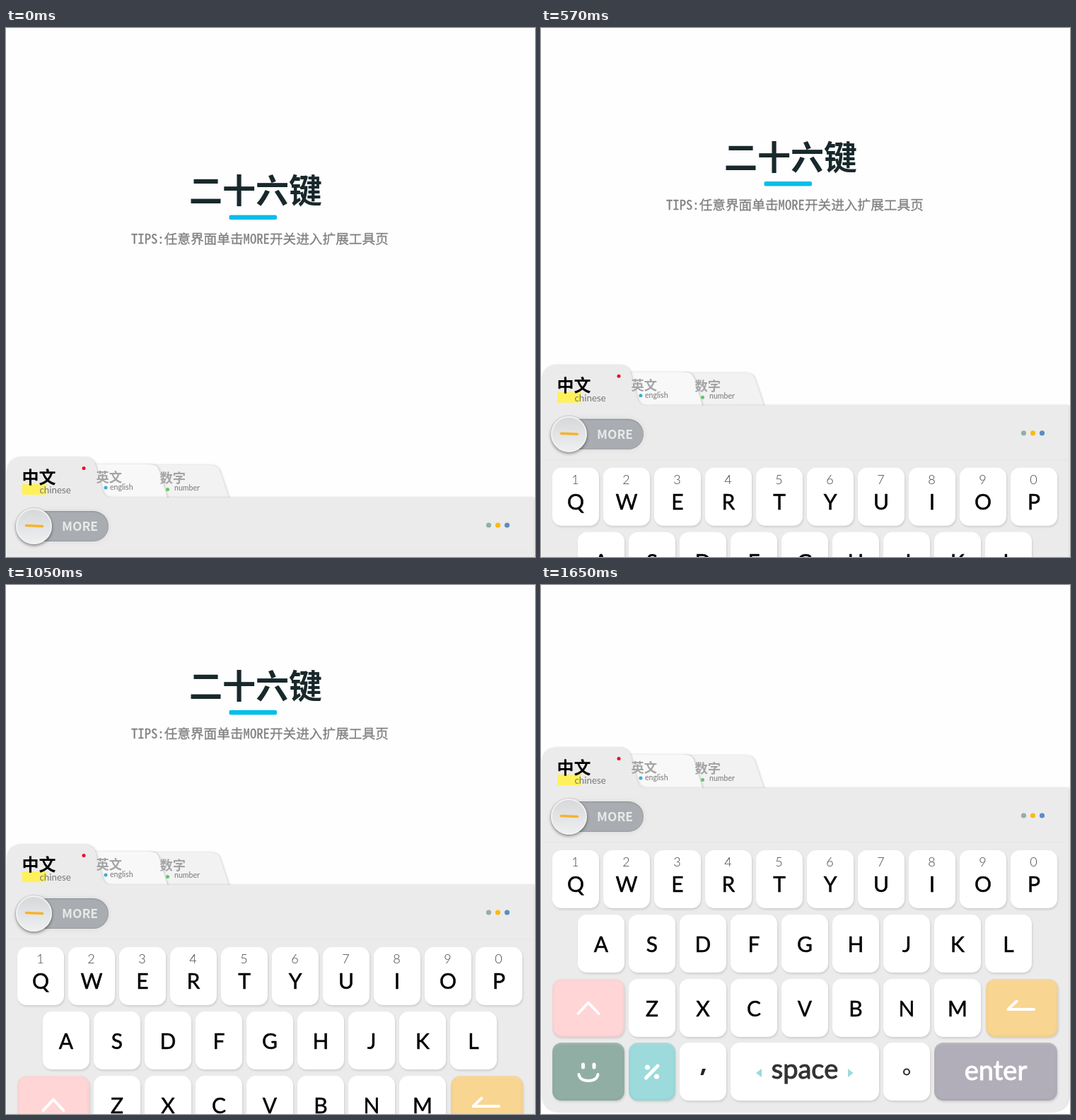
An HTML page that plays this animation: 748 px wide and 748 px high, repeating every 2.65 s.

```html
<!DOCTYPE html>
<html lang="zh-CN">
<meta charset="utf-8">
<style>
html, body { margin: 0; width: 100%; height: 100%; overflow: hidden; background: #fefefe }
#stage { position: absolute; left: 0; top: 0; width: 748px; height: 748px; overflow: hidden }
#title, #board, #board svg { position: absolute; left: 0; top: 0; width: 748px; height: 748px }
.key, .pill, .knob { position: absolute; box-sizing: border-box }
.key { height: 82px; border-radius: 13px; background: #fff; box-shadow: 1px 2px 3px #0000001f }
.key.tint { box-shadow: 1px 2px 3px #0000001f, inset 0 2px 3px #ffffff40, inset 0 0 4px #00000018 }
.pill { left: 22px; top: 306px; width: 123px; height: 43px; border-radius: 22px; background: #a9adb1;
  box-shadow: inset 0 1px 2px #0000002e, inset 0 -1px 1px #00000018, 0 0 9px #00000012 }
.knob { left: 14px; top: 302px; width: 51px; height: 51px; border-radius: 50%; border: 2px solid #f1f1f1;
  background: linear-gradient(#d6d8da, #eeeff0); box-shadow: 0 2px 4px #0000006b, 0 0 2px #00000040 }
svg { overflow: visible }
text { font-family: Lato, sans-serif }
.cjk { font-family: "Noto Sans CJK SC", "Noto Sans CJK", sans-serif; font-weight: 700 }
.tips { font: 18.67px "Noto Sans Mono CJK SC", "Noto Sans CJK SC", monospace; fill: #808080; stroke: #808080; stroke-width: .3 }
.tab { filter: drop-shadow(1px 0 1.5px #00000030) }
.mid { text-anchor: middle }
.letter { font-size: 30px; stroke: #000; stroke-width: .5; stroke-linejoin: round }
.digit { font-size: 18px; font-weight: 300; fill: #444 }
.word { font-size: 38px; stroke-width: 1; stroke-linejoin: round }
.icon { fill: none; stroke: #fff; stroke-width: 4; stroke-linecap: round; stroke-linejoin: round }
</style>
<div id="stage">
  <svg id="title">
    <text class="cjk" x="259" y="247" font-size="47" fill="#18282b">二十六键</text>
    <rect x="315.5" y="264.5" width="67.5" height="6.5" rx="2" fill="#00bfe8"/>
    <text class="tips" x="177" y="304.5">TIPS:任意界面单击MORE开关进入扩展工具页</text>
  </svg>
  <div id="board">
    <svg>
      <path class="tab" fill="#f2f2f2" d="M200 290V241H289Q300 241 303 251L316 290Z"/>
      <path class="tab" fill="#f8f8f8" d="M110 290V240H204Q214 240 217 250L229 290Z"/>
      <path class="tab" fill="#ebebeb" d="M1 252Q1 230 23 230H111Q123 230 127 242L136 276Q139 287 147 287H746V719Q746 745 720 745H27Q1 745 1 719Z"/>
      <path d="M1 364H746" stroke="#e7e7e7" stroke-width="1.5"/>
      <rect x="23" y="268" width="34" height="15" fill="#fff15c"/>
      <g class="cjk">
        <text class="cjk" x="22.5" y="267" font-size="24">中文</text>
        <text class="cjk" x="127.5" y="265" font-size="18.3" fill="#a4a4a4">英文</text>
        <text class="cjk" x="217.5" y="266" font-size="18.3" fill="#a4a4a4">数字</text>
      </g>
      <g fill="#777" font-weight="400">
        <text x="47.5" y="281" font-size="13.3">chinese</text>
        <text x="147" y="276" font-size="10.6">english</text>
        <text x="238" y="277" font-size="10.6">number</text>
      </g>
      <circle cx="110" cy="245.5" r="2.5" fill="#ec0d2e"/>
      <circle cx="141" cy="273" r="2.5" fill="#3fadd0"/>
      <circle cx="228.5" cy="275.5" r="2.5" fill="#5fc765"/>
      <circle cx="682.5" cy="326" r="3.6" fill="#92b0a5"/>
      <circle cx="695.5" cy="326" r="3.6" fill="#fdb913"/>
      <circle cx="708.5" cy="326" r="3.6" fill="#5a8dc0"/>
    </svg>
    <div class="pill"></div>
    <div class="knob"></div>
    <div id="keys"></div>
    <svg>
      <path class="icon" d="M28.5 326.5L51.5 327.5" style="stroke:#f5b32e;stroke-width:3.5"/>
      <text class="cjk" x="79" y="334" font-size="17.5" fill="#e8e9ea">MORE</text>
      <g id="labels"></g>
      <g class="icon">
        <path d="M52.5 606L67 590.5L81.5 606M697 600H660.5L672.5 588.5"/>
        <path d="M53.5 692Q55 701 67 701Q79 701 80.500 692"/>
        <path d="M59.500 678V682M75 678V682M148.500 697L165 680" stroke-width="5"/>
      </g>
      <g fill="#fff"><circle cx="150.500" cy="682" r="3.600"/><circle cx="163.500" cy="695" r="3.600"/></g>
      <path d="M228 684H233L229.500 693H225.500Z" fill="#222"/>
      <path d="M304 690L312 684V696ZM441.500 690L434 684V696Z" fill="#9cdadb"/>
      <circle cx="517" cy="688.500" r="4" fill="none" stroke="#333" stroke-width="2.200"/>
      <text class="word mid" x="373" y="698" fill="#333" stroke="#333">space</text>
      <text class="word mid" x="643" y="700" fill="#fff" stroke="#fff">enter</text>
    </svg>
  </div>
</div>
<script>
const byId = id => document.getElementById(id);
let keys = '', labels = '';

function addKey(x, y, width = 66, color = '') {
  const tint = color && ` tint" style="background:${color};`;
  keys += `<div class="key${tint || '" style="'}left:${x}px;top:${y}px;width:${width}px"></div>`;
}
function addLabel(kind, x, y, char) {
  labels += `<text class="mid ${kind}" x="${x}" y="${y}">${char}</text>`;
}
function addRow(chars, left, top, baseline) {
  [...chars].forEach((char, i) => {
    const x = left + i * 72;
    addKey(x, top);
    addLabel('letter', x + 33, baseline, char);
  });
}

addRow('QWERTYUIOP', 16, 375, 434);
[...'1234567890'].forEach((digit, i) => addLabel('digit', 48.5 + i * 72, 398, digit));
addRow('ASDFGHJKL', 52, 466, 519);
addRow('ZXCVBNM', 124, 556.5, 610);
addKey(16, 556.5, 102, '#ffd5d5');
addKey(628.5, 556.5, 102, '#f9d592');
addKey(16, 647, 102, '#91aea5');
addKey(124, 647, 66, '#9cdadb');
addKey(196, 647);
addKey(268, 647, 210);
addKey(484, 647);
addKey(556, 647, 174, '#b1aeb9');
byId('keys').innerHTML = keys;
byId('labels').innerHTML = labels;

const LOOP = 2650, RISE = 1650, STEP = 30;
const start = performance.now();

function draw(now) {
  const elapsed = Math.max(0, now - start) % LOOP;
  const t = Math.min(RISE, Math.floor(elapsed / STEP) * STEP);
  const fade = Math.min(1, (RISE - t) / 550);
  byId('board').style.transform = `translateY(${377 * (1 - t / RISE)}px)`;
  byId('title').style.transform = `translateY(${-t / 12}px)`;
  byId('title').style.opacity = fade < .08 ? 0 : fade;
  requestAnimationFrame(draw);
}
draw(start);
</script>
</html>
```
